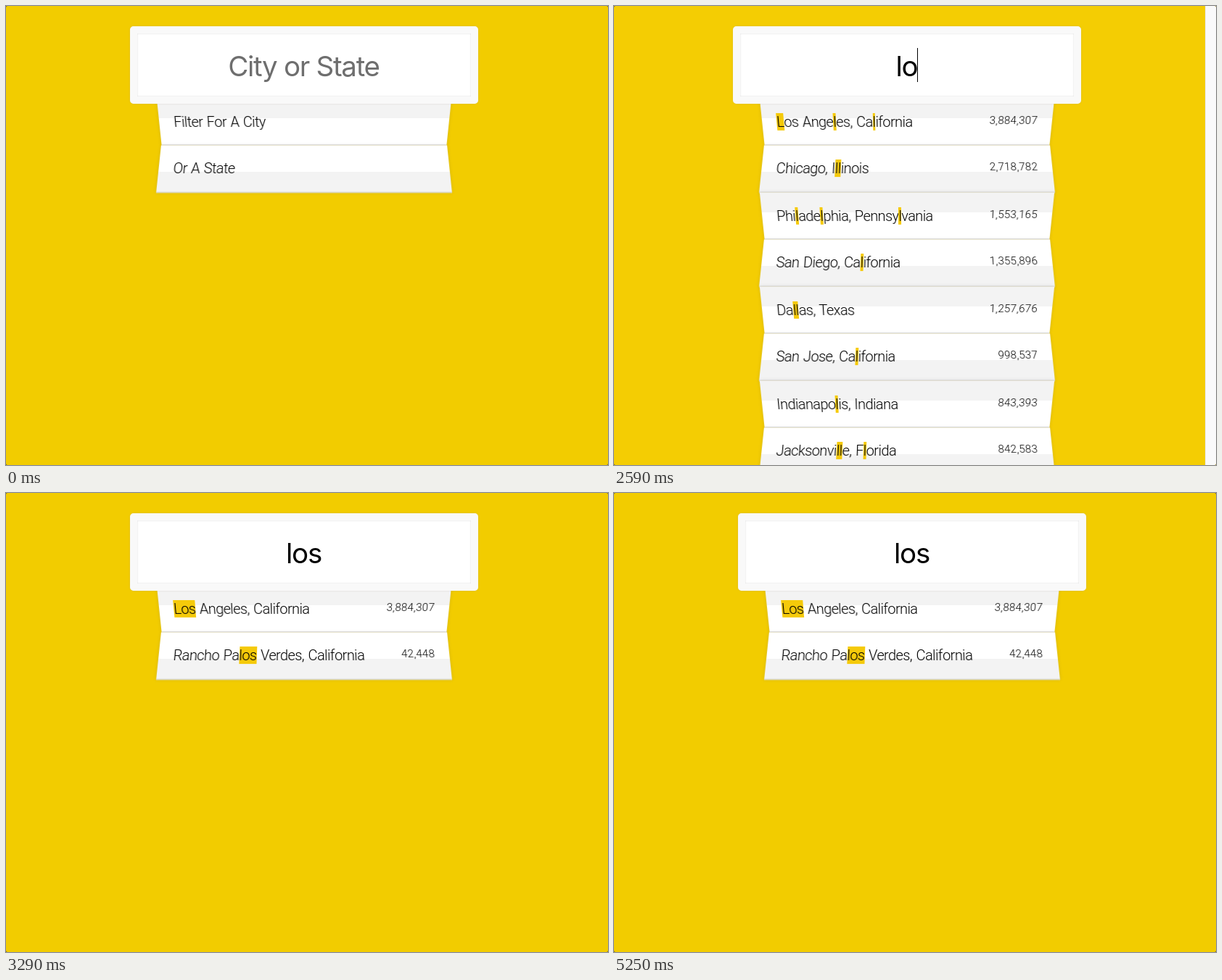
Animation, 830 px wide and 634 px high, one loop 5.74 s. Source, as an HTML page:

```html
<!DOCTYPE html>
<html lang="en">
<head>
<meta charset="utf-8">
<title>City search</title>
<style>
  * { box-sizing: border-box; }
  html, body { margin: 0; width: 100%; height: 100%; overflow: hidden; background: #554c28; }
  #stage {
    position: relative; width: 830px; height: 634px; overflow: hidden;
    border-radius: 2px; background: #f2cc00;
    font: 300 20px/24px Roboto, "Liberation Sans", sans-serif; color: #000;
  }
  #stage.long { background: #f4cd03; }
  #form { position: absolute; left: 211px; top: 0; width: 400px; }
  .long #form { left: 204px; }

  #field {
    position: absolute; z-index: 2; left: -40px; top: 28px; width: 480px; height: 107px;
    border: 10px solid #f9f9f9; border-radius: 5px; background: #fff;
    box-shadow: 0 0 1px #e8e2c8, 0 0 3px rgba(0,0,0,.1), inset 0 0 2px rgba(0,0,0,.19);
  }
  #value {
    position: absolute; inset: 20px 1px 0 0; text-align: center; white-space: pre;
    font: 400 38.5px/50px Inter, "Liberation Sans", sans-serif; letter-spacing: -1.3px;
  }
  #value.empty { color: #6e6e6e; }
  #caret { position: absolute; top: 20px; width: 1px; height: 47px; background: #000; }

  #list { position: absolute; top: 125px; width: 400px; margin: 0; padding: 0; }
  li {
    display: flex; justify-content: space-between; padding: 20px; list-style: none;
    border-bottom: 1px solid #d8d8d8;
    box-shadow: 0 .5px 0 #d8d8d8, 0 0 1px #d8d8d8, 0 0 5px rgba(0,0,0,.12);
  }
  li:nth-child(odd) {
    transform: perspective(100px) rotateX(-3deg) translateY(3px);
    background: linear-gradient(#f3f3f3 42%, #fff 42%);
  }
  li:nth-child(even) {
    transform: perspective(100px) rotateX(3deg) translateY(2px) scale(1.001);
    background: linear-gradient(#fff 58%, #f3f3f3 58%);
  }
  .name { max-width: 290px; letter-spacing: -.6px; word-spacing: 1.2px; }
  .count { font-size: 15px; line-height: 20px; letter-spacing: .25px; }
  .hl { background: #f5ca0a; }

  #bar {
    position: absolute; right: 0; top: 0; width: 15px; height: 100%;
    background: #fafafa; border-left: 1px solid #e8e8e8; display: none;
  }
  .long #bar { display: block; }
  #thumb {
    position: absolute; left: 4px; top: 0; width: 8px; height: 54px;
    border-radius: 4px; background: #c1c1c1;
  }
</style>
</head>
<body>
<div id="stage">
  <div id="form">
    <div id="field"><div id="value"></div><div id="caret"></div></div>
    <ul id="list"></ul>
  </div>
  <div id="bar"><div id="thumb"></div></div>
</div>
<script>
const LOOP = 5740;
const CITIES = [
  ["Los Angeles, California", "3,884,307"],
  ["Chicago, Illinois", "2,718,782"],
  ["Philadelphia, Pennsylvania", "1,553,165"],
  ["San Diego, California", "1,355,896"],
  ["Dallas, Texas", "1,257,676"],
  ["San Jose, California", "998,537"],
  ["Indianapolis, Indiana", "843,393"],
  ["Jacksonville, Florida", "842,583"],
  ["Charlotte, North Carolina", "792,862"],
  ["Denver, Colorado", "649,495"],
  ["Louisville/Jefferson County, Kentucky", "609,893"],
  ["Long Beach, California", "469,428"],
  ["Colorado Springs, Colorado", "439,886"],
  ["Miami, Florida", "417,650"],
  ["Rancho Palos Verdes, California", "42,448"]
];
const HINTS = [["Filter For A City", ""], ["Or A State", ""]];

// start time, typed text, text the list is filtered by, caret shown
const STEPS = [
  [0, "", "", false],
  [1400, "", "", true],
  [1890, "", "", false],
  [2100, "l", "", true],
  [2590, "lo", "l", true],
  [2660, "lo", "lo", true],
  [2730, "los", "lo", true],
  [2800, "los", "los", true],
  [3150, "los", "los", false],
  [3710, "los", "los", true],
  [4200, "los", "los", false],
  [4760, "los", "los", true],
  [5250, "los", "los", false]
];
// caret distance from the field's centre, by number of typed letters
const CARET = [0, 4, 14, 24];

const $ = id => document.getElementById(id);

function row([name, count], query) {
  const label = query
    ? name.replace(new RegExp(query, "gi"), m => `<span class="hl">${m}</span>`)
    : name;
  return `<li><span class="name">${label}</span><span class="count">${count}</span></li>`;
}

function show([, text, query, caret]) {
  const rows = query
    ? CITIES.filter(([name]) => name.toLowerCase().includes(query))
    : HINTS;
  $("list").innerHTML = rows.map(r => row(r, query)).join("");
  $("stage").classList.toggle("long", rows.length > 2);
  $("thumb").hidden = query === "l";
  $("value").textContent = text || "City or State";
  $("value").classList.toggle("empty", !text);
  $("caret").hidden = !caret;
  $("caret").style.left = 230 + CARET[text.length] + "px";
}

const start = performance.now();
let current = null;

function tick() {
  const t = (performance.now() - start) % LOOP;
  const step = STEPS.findLast(([from]) => from <= t);
  if (step !== current) show(current = step);
  requestAnimationFrame(tick);
}
tick();
</script>
</body>
</html>
```
